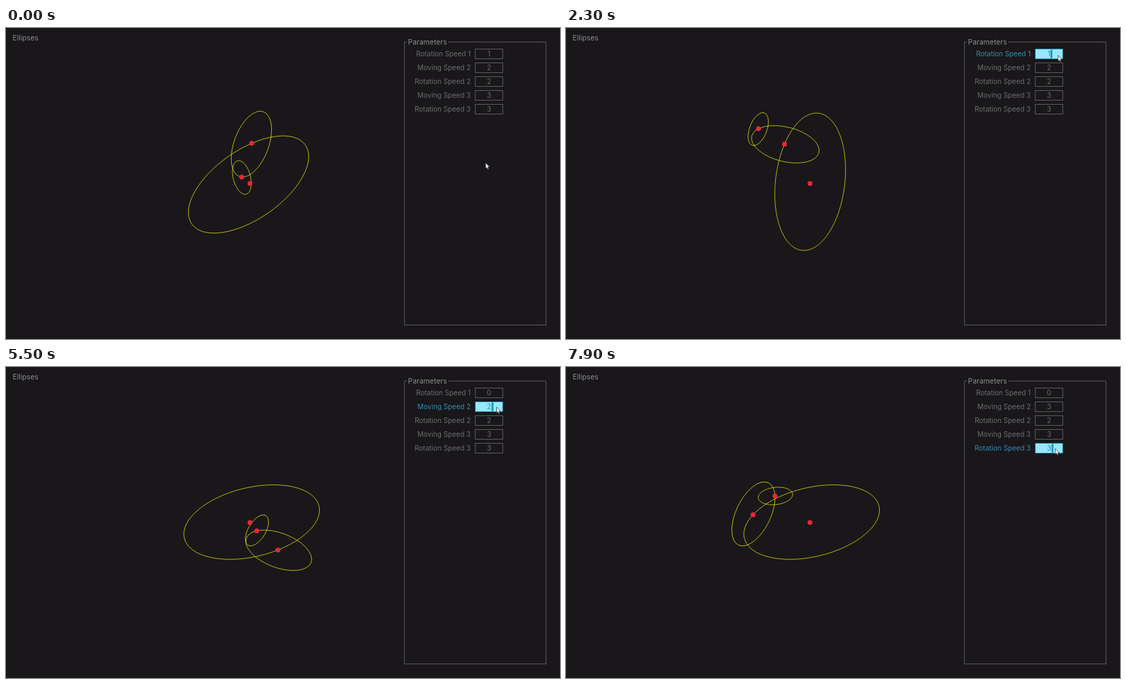
An HTML page that plays this animation: 800 by 450 pixels, repeating every 8 s.

```html
<!DOCTYPE html>
<html lang="en">
<head>
<meta charset="utf-8">
<title>Ellipses</title>
<style>
  html, body { margin: 0; width: 100%; height: 100%; overflow: hidden; background: #19171a; }
  svg { display: block; width: 800px; height: 450px; background: #19171a; }
  text { font: 10px Inter, "DejaVu Sans", sans-serif; }
  .heading { fill: #8c8c8c; font-size: 10.4px; }
  .frame, .orbit, .box { stroke-width: .625; }
  .frame { fill: none; stroke: #838383; }
  .orbit { fill: none; stroke: #fdf900; }
  .dot { fill: #e62937; }
  .row { --border: #838383; --base: none; --ink: #6c6c6c; }
  .row.hover { --border: #5bb2d9; --ink: #6c9bbc; }
  .row.edit { --border: #0492c7; --base: #97e8ff; --ink: #368baf; }
  .box { fill: var(--base); stroke: var(--border); }
  .row text { fill: var(--ink); }
  .label { text-anchor: end; }
  .value { text-anchor: middle; }
  .caret { fill: #0492c7; }
  .pointer { fill: #fff; stroke: #111; stroke-width: .6; }
</style>
</head>
<body>
<svg id="stage" viewBox="0 0 800 450">
  <text class="heading" x="9.5" y="18">Ellipses</text>
  <path class="frame" d="M579 20.3H575.3V429.7H779.7V20.3H639"/>
  <text class="heading" x="580.5" y="23.5">Parameters</text>
</svg>
<script>
const LOOP = 8000, STEP = 100;
const START = 5.675;                 // clock already run when the loop begins, in s
const HUB = { x: 352.3, y: 225 };
const SIZES = [100, 50, 25];         // semi-major axes; the minor ones are half
const SHIFT = 0.025;                 // curve centre lies this far behind its dot
const BLINK = 2 / 3;

const stage = document.getElementById('stage');

function add(parent, tag, attrs, text = '') {
  const el = document.createElementNS('http://www.w3.org/2000/svg', tag);
  set(el, attrs);
  el.textContent = text;
  return parent.appendChild(el);
}

function set(el, attrs) {
  for (const key in attrs) el.setAttribute(key, attrs[key]);
}

// Arc length of the ellipse (cos p, sin p / 2), for even speed along it
const PARTS = 720;
const arc = [0];
for (let i = 1; i <= PARTS; i++) {
  const p = (i - 0.5) / PARTS * 2 * Math.PI;
  arc.push(arc[i - 1] + Math.hypot(Math.sin(p), Math.cos(p) / 2) * 2 * Math.PI / PARTS);
}

function paramAt(length) {
  const total = arc[PARTS];
  const s = ((length % total) + total) % total;
  let i = 1;
  while (i < PARTS && arc[i] < s) i++;
  const part = (s - arc[i - 1]) / (arc[i] - arc[i - 1]);
  return (i - 1 + part) / PARTS * 2 * Math.PI;
}

// Point on an ellipse around a dot, after travelling a length in units of its size
function pointOn(dot, size, angle, length) {
  const p = paramAt(length);
  const x = size * (Math.cos(p) - SHIFT), y = size * Math.sin(p) / 2;
  const c = Math.cos(angle), s = Math.sin(angle);
  return { x: dot.x + x * c - y * s, y: dot.y + x * s + y * c };
}

const orbits = SIZES.map(a => add(stage, 'ellipse', { class: 'orbit', rx: a, ry: a / 2 }));
const dots = SIZES.map(() => add(stage, 'circle', { class: 'dot', r: 3.5 }));

// Each row: label, [time, value] steps, editing span
const ROWS = [
  { label: 'Rotation Speed 1', values: [[0, '1'], [3.515, ''], [3.65, '0']], edit: [2.133, 4.8] },
  { label: 'Moving Speed 2', values: [[0, '2'], [6.38, ''], [6.5, '3']], edit: [4.8, 7.25] },
  { label: 'Rotation Speed 2', values: [[0, '2']] },
  { label: 'Moving Speed 3', values: [[0, '3']] },
  { label: 'Rotation Speed 3', values: [[0, '3']], edit: [7.7, 9] }
];
ROWS.forEach((row, i) => {
  row.top = 30 + 20 * i;
  row.el = add(stage, 'g', { class: 'row' });
  add(row.el, 'text', { class: 'label', x: 671, y: row.top + 11 }, row.label);
  add(row.el, 'rect', { class: 'box', x: 677.8, y: row.top + 0.3, width: 39.4, height: 14.4 });
  row.value = add(row.el, 'text', { class: 'value', x: 697.5, y: row.top + 11 });
  row.caret = add(row.el, 'rect', { class: 'caret', y: row.top + 1.25, width: 2.5, height: 12.5 });
});

const pointer = add(stage, 'path', {
  class: 'pointer', d: 'M0 0V8.4L1.9 6.7 3.2 9.5 4.6 8.9 3.4 6.1H5.9Z'
});
const TRACK = [
  [0, 692.5, 195], [0.2, 692.5, 195], [0.6, 708, 100], [0.9, 716, 60], [1.1, 714, 45],
  [1.4, 711.5, 40.5], [1.8, 711.5, 40.5], [2, 710.5, 39.5], [4.5, 710.5, 39.5],
  [4.75, 708.5, 58], [7.2, 708.5, 58], [7.6, 706.5, 118], [8, 706.5, 118]
];

function pointerAt(t) {
  const i = TRACK.findIndex(k => k[0] > t);
  const [t0, x0, y0] = TRACK[i - 1], [t1, x1, y1] = TRACK[i];
  const k = (t - t0) / (t1 - t0);
  return { x: x0 + (x1 - x0) * k, y: y0 + (y1 - y0) * k };
}

function drawOrbits(t) {
  const clock = START + t;
  const angles = [START + Math.min(t, 3.515), 2 * clock, 3 * clock];
  const travel = START + Math.min(t, 6.38) + 1.5 * Math.max(0, t - 6.5);
  const second = pointOn(HUB, SIZES[0], angles[0], -travel);
  const third = pointOn(second, SIZES[1], angles[1], -3 * clock);
  [HUB, second, third].forEach((dot, i) => {
    const back = SHIFT * SIZES[i];
    const cx = dot.x - back * Math.cos(angles[i]);
    const cy = dot.y - back * Math.sin(angles[i]);
    const turn = angles[i] * 180 / Math.PI;
    set(orbits[i], { cx, cy, transform: `rotate(${turn} ${cx} ${cy})` });
    set(dots[i], { cx: dot.x, cy: dot.y });
  });
}

function drawPanel(t) {
  const mouse = pointerAt(t);
  for (const row of ROWS) {
    const editing = row.edit && t >= row.edit[0] && t < row.edit[1];
    const hover = mouse.x >= 677 && mouse.x <= 718 && mouse.y >= row.top && mouse.y <= row.top + 15;
    const value = row.values.filter(v => v[0] <= t).pop()[1];
    const lit = editing && ((t - row.edit[0]) / BLINK) % 1 < 0.5;
    row.el.setAttribute('class', 'row' + (editing ? ' edit' : hover ? ' hover' : ''));
    row.value.textContent = value;
    const width = value === '' ? 0 : value === '1' ? 1 : 2.5;
    set(row.caret, { x: 698.75 + width, visibility: lit ? 'visible' : 'hidden' });
  }
  pointer.setAttribute('transform', `translate(${mouse.x} ${mouse.y})`);
}

let begin;
function tick(now) {
  begin ??= now;
  const t = Math.floor((now - begin) % LOOP / STEP + 0.01) * STEP % LOOP / 1000;
  drawOrbits(t);
  drawPanel(t);
  requestAnimationFrame(tick);
}
drawOrbits(0);
drawPanel(0);
requestAnimationFrame(tick);
</script>
</body>
</html>
```
